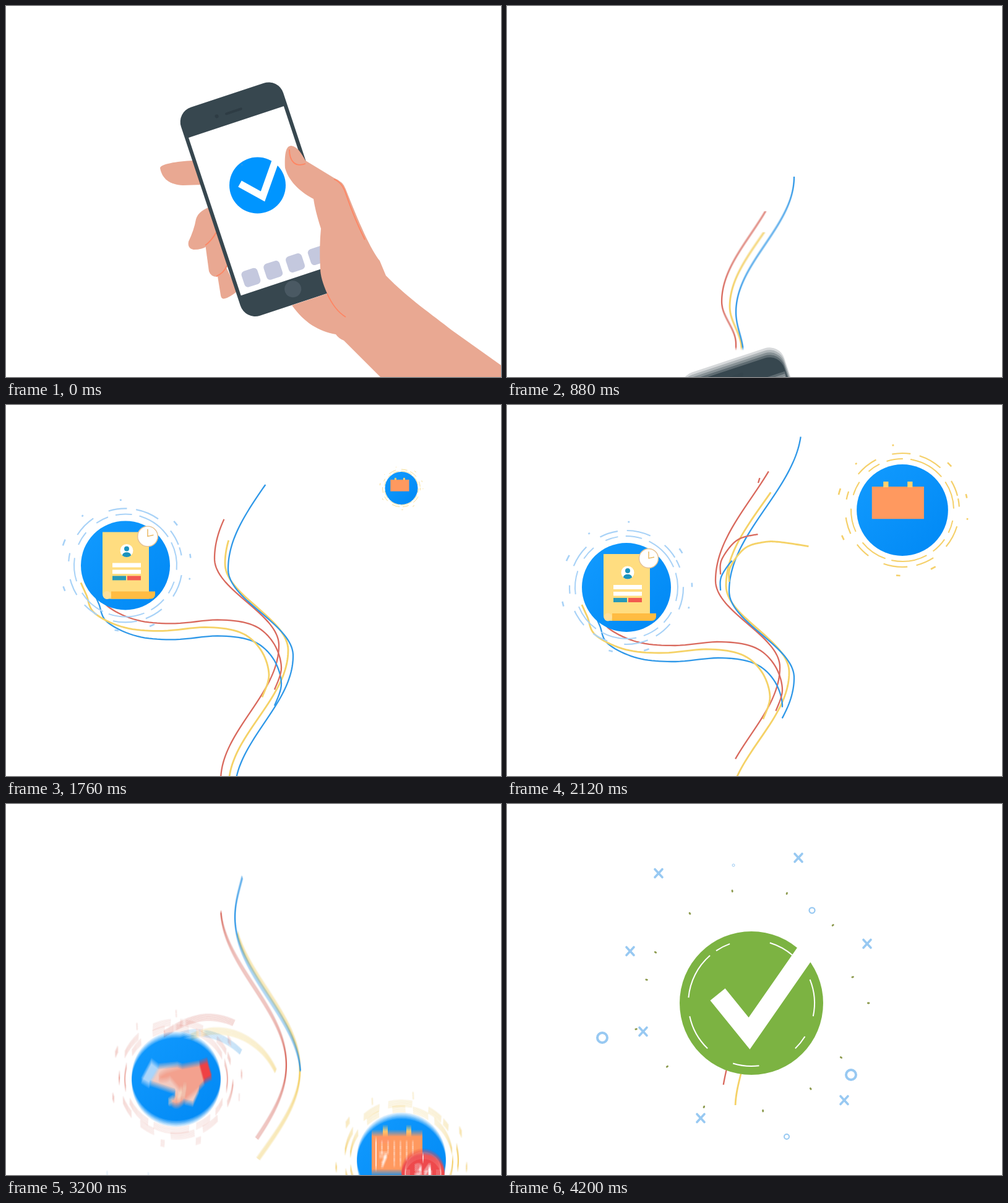
Write an HTML page with a canvas that moves like this. It is 800 px wide and 600 px high and loops after 4.24 s.

```html
<!DOCTYPE html>
<html lang="en">
<head>
<meta charset="utf-8">
<title>Phone journey</title>
<style>
html, body { margin: 0; width: 100%; height: 100%; overflow: hidden; background: #fff; }
canvas { display: block; }
</style>
</head>
<body>
<canvas id="stage" width="800" height="600"></canvas>
<script>
const LOOP = 4240, STEP = 40;
const view = document.getElementById('stage').getContext('2d');
const layer = document.createElement('canvas');
layer.width = 800; layer.height = 600;
const c = layer.getContext('2d');

const BLUE = '#2f98e8', RED = '#d9695d', YELLOW = '#f5d267', SKIN = '#e9a892', CREASE = '#ff8562';

// ---------- timing ----------
const clamp = x => Math.max(0, Math.min(1, x));
const span = (t, a, b) => clamp((t - a) / (b - a));
const ease = x => 1 - (1 - x) ** 3;
const pop = x => x <= 0 ? 0 : 1 + 2.2 * (x - 1) ** 3 + 1.2 * (x - 1) ** 2;

function random(seed) {
  return () => (seed = (seed * 16807 + 11) % 2147483647) / 2147483647;
}

// camera keys: time, offset, speed
const CAMERA = [[0, 0, 0], [480, 130, .54], [1320, 382, .1], [2120, 461, .1],
  [2720, 611, .42], [3200, 867, .64], [3880, 1185, 0]];
function camera(t) {
  const i = CAMERA.findIndex(k => k[0] >= t);
  if (i < 0) return 1185;
  if (i === 0) return 0;
  const [t0, s0, v0] = CAMERA[i - 1], [t1, s1, v1] = CAMERA[i];
  const d = t1 - t0, x = (t - t0) / d, y = 1 - x;
  return s0 * (1 + 2 * x) * y * y + v0 * d * x * y * y + s1 * x * x * (3 - 2 * x) - v1 * d * x * x * y;
}

// ---------- drawing helpers ----------
function at(x, y, scale, draw, angle = 0) {
  if (scale <= 0) return;
  c.save(); c.translate(x, y); c.rotate(angle); c.scale(scale, scale); draw(); c.restore();
}
function disc(x, y, r, fill) {
  c.beginPath(); c.arc(x, y, r, 0, 7); c.fillStyle = fill; c.fill();
}
function hoop(x, y, r, color, width, a = 0, b = Math.PI * 2) {
  c.beginPath(); c.arc(x, y, r, a, b); c.strokeStyle = color; c.lineWidth = width; c.stroke();
}
function box(x, y, w, h, fill, r = 0) {
  c.beginPath(); c.roundRect(x, y, w, h, r); c.fillStyle = fill; c.fill();
}
function line(color, width, ...p) {
  c.beginPath();
  for (let i = 0; i < p.length; i += 2) c.lineTo(p[i], p[i + 1]);
  c.strokeStyle = color; c.lineWidth = width; c.stroke();
}
function shape(fill, d) { c.fillStyle = fill; c.fill(new Path2D(d)); }
function stroke(color, width, d) { c.strokeStyle = color; c.lineWidth = width; c.stroke(new Path2D(d)); }
function label(s, x, y, size) {
  c.font = `bold ${size}px "Open Sans", sans-serif`;
  c.textAlign = 'center'; c.textBaseline = 'middle'; c.fillStyle = '#fff'; c.fillText(s, x, y);
}

// ---------- ribbons ----------
const thickness = color => color === YELLOW ? 2.8 : 2.3;

// A stem is a chain of half cosine waves between the turning levels.
const LEVELS = [258, 190, -29, -169, -437, -693, -800];
const STEMS = [
  { color: RED, lag: -8, turns: [370, 347, 441, 337, 453, 347, 362], head: 312, tail: 970, speed: .405 },
  { color: YELLOW, lag: 0, turns: [379, 360, 456, 354, 475, 369, 386], head: 346, tail: 1003, speed: .405 },
  { color: BLUE, lag: 9, turns: [382, 370, 464, 359, 476, 370, 388], head: 256, tail: 989, speed: .445 }
];

function stemX({ turns, lag }, y) {
  const level = y - lag;
  let i = 1;
  while (i < LEVELS.length - 1 && LEVELS[i] > level) i++;
  const u = span(level, LEVELS[i - 1], LEVELS[i]);
  return turns[i - 1] + (turns[i] - turns[i - 1]) * (1 - Math.cos(Math.PI * u)) / 2;
}

function drawStem(s, t) {
  const top = Math.max(-800, s.head - .314 * t), bottom = Math.min(258, s.tail - s.speed * t);
  const points = [];
  for (let y = bottom; y > top; y -= 4) points.push(stemX(s, y), y);
  if (top < bottom) points.push(stemX(s, top), top);
  line(s.color, thickness(s.color), ...points);
}

// Three shifted copies of one curve lead from the stem to a badge.
const BRANCHES = [
  { points: [434, 35, 445, -1, 432, -41, 400, -69, 345, -78, 270, -72, 210, -78, 163, -101, 150, -130, 141, -150],
    strands: [[BLUE, 0, 26], [RED, 0, 0], [YELLOW, -20, 12]], start: 1080, gap: 95, rate: .0208, leave: 1970 },
  { points: [345, -187, 347, -211, 370, -241, 400, -251, 430, -251, 500, -240, 570, -229, 597, -232, 640, -245],
    strands: [[YELLOW, 14, 12], [RED, 0, 0], [BLUE, 0, 26]], start: 1862, gap: 80, rate: .018, leave: 2600 },
  { points: [406, -335, 429, -414, 428, -445, 405, -485, 370, -512, 330, -522, 293, -515, 255, -495],
    strands: [[RED, 0, 0], [BLUE, -20, 25], [YELLOW, 13, 22]], start: 2105, gap: 200, rate: .01, leave: 2548 }
];

function curvePoint(p, u) {
  const last = p.length / 2 - 1, i = Math.min(last - 1, Math.floor(u)), x = u - i;
  return [0, 1].map(k => {
    const [a, b, d, e] = [-1, 0, 1, 2].map(o => p[2 * Math.max(0, Math.min(last, i + o)) + k]);
    return b + .5 * x * (d - a + x * (2 * a - 5 * b + 4 * d - e + x * (3 * (b - d) + e - a)));
  });
}

function drawBranch({ points, strands, start, gap, rate, leave }, t) {
  const last = points.length / 2 - 1;
  strands.forEach(([color, dx, dy], i) => {
    const head = Math.min(last, (t - start - i * gap) * rate);
    const tail = Math.max(0, (t - leave - i * 140) * .0062);
    if (head <= tail) return;
    const path = [];
    for (let k = 0; k <= 80; k++) path.push(...curvePoint(points, tail + (head - tail) * k / 80));
    at(dx, dy, 1, () => line(color, thickness(color), ...path));
  });
}

// ---------- phone and hand ----------
function phone() {
  shape(SKIN, 'M303 250C275 251 249 256 249 262C252 279 264 289 286 290L318 289Z');
  shape(SKIN, 'M342 437L347 468Q348 475 354 473Q362 471 374 461L350 410Z');
  shape(SKIN, 'M322 385L328 429Q331 438 341 438Q352 432 360 418L340 360Z');
  shape(SKIN, 'M327 326Q310 333 307 345Q304 362 295 381Q293 392 303 394Q318 394 325 388Q333 380 342 364Z');
  stroke(CREASE, 1.8, 'M322 387Q331 381 340 366M340 437Q352 432 357 420');
  at(414.3, 315.1, 1, () => {
    box(-87, -180, 174, 355, '#37474f', 25);
    box(-81, -134.5, 162, 269, '#fff');
    c.lineCap = 'round';
    line('#2e3c44', 4, -11, -152, 14, -152);
    c.lineCap = 'butt';
    disc(-27, -153, 3, '#2e3c44');
    disc(2, 151, 13.5, '#4a5963');
    for (let i = 0; i < 4; i++) box(-70 + i * 37.7, 98.5, 27, 27, '#c4c8de', 6);
  }, -.32);
  disc(406.5, 290, 45.5, '#0095ff');
  line('#fff', 11.5, 378, 287.5, 415, 308, 437, 246);
  shape(SKIN, `M519 465Q508 440 508 425Q506 390 509 360C502 338 499 325 497 312
    C480 303 458 287 451 262C450 240 452 226 461 226C472 228 477 238 484 250L530 278
    Q545 284 549 296C570 350 590 395 604 412L614 436C650 473 690 500 720 524L800 581V600H605
    L546 541Q538 538 533 531C505 526 482 512 462 484Z`);
  stroke(CREASE, 1.8, `M458 232C458 252 468 261 484 255M530 280Q543 285 549 303Q563 344 580 378
    M519 465Q531 492 549 503`);
}

// ---------- badges ----------
function dashes(seed, long, gap) {
  const next = random(seed);
  return Array.from({ length: 12 }, (_, i) => (i % 2 ? gap : long) * (.35 + next()));
}
const RINGS = [
  { gap: 11, width: 2, turn: 1, dash: dashes(71, 60, 18) },
  { gap: 20, width: 2.2, turn: -1, dash: dashes(523, 38, 28) },
  { gap: 34, width: 2.6, turn: .6, dash: dashes(97, 8, 85) }
];

function badge(x, y, from, t, ink, icon) {
  at(x, y, pop(span(t, from, from + 500)), () => {
    const g = c.createLinearGradient(-72, -72, 72, 72);
    g.addColorStop(0, '#129bff'); g.addColorStop(1, '#0088f4');
    disc(0, 0, 72, g);
    icon();
  });
  for (const { gap, width, turn, dash } of RINGS)
    at(x, y, ease(span(t, from, from + 400)), () => {
      c.setLineDash(dash);
      hoop(0, 0, 72 + gap, ink, width);
    }, turn * (t - from) * .0005);
}

function paper(t) {
  const open = ease(span(t, 1320, 1660)), show = pop(span(t, 1312, 1680));
  const top = -45 - 9 * open, bottom = 31 + 23 * open;
  box(-37, top, 75, bottom - top, '#ffdd80', [0, 0, 0, 8 * open]);
  if (open > 0) {
    box(-23, bottom - 12 * open, 71 * open, 12 * open, '#ffbc42', [0, 0, 7, 0]);
    disc(-30, bottom - 6, 6.5 * open, '#ffe09a');
  }
  at(2, -32 + 8 * open, show, () => {
    disc(0, 0, 10.5, '#fff');
    disc(0, -3, 4, '#1b93bd');
    shape('#1b93bd', 'M-7 8C-7 1 7 1 7 8Q0 13 -7 8Z');
  });
  at(2, 10, show, () => {
    box(-23, -14, 46, 7, '#fff'); box(-23, -3, 46, 6.5, '#fff');
    box(-23, 7, 22, 7, '#2799b8'); box(1, 7, 22, 7, '#f25a4f');
  });
  at(36, -47, pop(span(t, 1560, 1860)), () => {
    disc(0, 0, 16, '#fff');
    hoop(0, 0, 15.5, '#e5c091', 1.4);
    line('#e9b862', 1.4, 0, -11, 0, 0, 9, -2);
  });
}

function calendar(t) {
  const open = ease(span(t, 2120, 2420));
  const top = -37 - 7 * open;
  box(-48, top, 82, 51 + 13 * open, '#ff995f');
  box(-30, top - 8, 8, 9, '#ffd170'); box(8, top - 8, 8, 9, '#ffd170');
  c.save();
  c.globalAlpha *= span(t, 2200, 2440);
  line('#fff', 1.5, -41, -34, -41, 14);
  line('#ff8b8b', 2, -39, -33, -18, -33);
  for (let i = 0; i < 24; i++) {
    const col = i % 6, row = i / 6 | 0;
    if (row < 2 || col > 1) box(-33 + col * 10, -28 + row * 10, 3, 5, '#ffe3d2');
  }
  label('7', -29, 2, 26);
  c.restore();
  at(35, 21, pop(span(t, 2260, 2560)), () => {
    disc(0, 0, 35, '#ee494c');
    hoop(0, 0, 29, '#ffc5c0', 1.5);
    for (let i = 0; i < 4; i++) at(0, 0, 1, () => line('#fff', 2, 0, -29, 0, -21), i * Math.PI / 2);
    label('24', 0, 0, 27);
  });
}

function handshake(t) {
  const close = span(t, 2720, 2920), lift = -8 * close + Math.sin(span(t, 2920, 3600) * 12) * 2;
  c.beginPath(); c.arc(0, 0, 72, 0, 7); c.clip();
  at(15 * close, lift, 1, () => {
    shape('#f2cbc1', 'M-44 -11L-13 -14L3 -8L20 10L22 28L12 50L0 47L-14 40L-17 30L-58 16Z');
    shape('#a9d5fb', 'M-72 12L-55 -20L-42 -10L-59 20Z');
  });
  at(-15 * close, lift, 1, () => {
    shape('#f3a18e', 'M58 -17L25 -11L0 -4Q-18 4 -12 11Q-2 13 5 8L22 28L6 48Q14 57 23 50L50 27L61 15Z');
    shape('#ef4144', 'M52 -16L65 -21L73 7L60 14Z');
  });
  at(4, 36 + lift, 1, () => {
    c.lineCap = 'round';
    for (let i = 0; i < 4; i++)
      line(i % 2 ? '#f0bdaa' : '#f6d2bd', 6, -8 + i * 6, 6 - i * 7, -14 + i * 7, 10 - i * 2);
    c.lineCap = 'butt';
  });
}

// ---------- finish ----------
const CROSSES = [[-150, -210], [76, -235], [-196, -84], [187, -96], [-175, 46], [-82, 186], [150, 157]];
const HOOPS = [[-241, 56, 8], [161, 116, 8], [98, -150, 4.5], [57, 216, 4], [-29, -223, 2]];

function confetti(burst) {
  c.lineCap = 'round';
  for (const [x, y] of CROSSES)
    at(x * burst, y * burst, burst, () => {
      line('#98c9f2', 3.6, -6, -6.5, 6, 6.5);
      line('#98c9f2', 3.6, -6, 6.5, 6, -6.5);
    });
  c.lineCap = 'butt';
  for (const [x, y, r] of HOOPS) hoop(x * burst, y * burst, r * burst, '#98c9f2', r / 2);
  const next = random(29);
  for (let i = 0; i < 14; i++) {
    const angle = (i + next() * .6) / 14 * Math.PI * 2, far = (168 + next() * 26) * burst;
    at(0, 0, 1, () => box(far - 2.2, -1.4, 4.4, 2.8, '#8c9a4e', 1.4), angle);
  }
}

function finish(t) {
  const burst = ease(span(t, 3700, 4200)), rad = Math.PI / 180;
  if (burst > 0) confetti(burst);
  at(0, 0, pop(span(t, 3480, 3800)), () => {
    disc(0, 0, 116, '#7cb342');
    const grow = span(t, 3720, 3960);
    for (let i = 0; i < 7; i++) {
      const from = 32 + i * 51, length = 14 + 10 * (i % 4);
      if (grow > 0) hoop(0, 0, 102, '#fff', 2, from * rad, (from + length * grow) * rad);
    }
    const drawn = 260 * ease(span(t, 3740, 4120));
    if (drawn > 0) {
      c.setLineDash([drawn, 400]);
      line('#fff', 31, -54.5, -14, -3.5, 49, 91, -87);
    }
  });
}

// ---------- scene ----------
function scene(t) {
  const drop = .000564 * t * t;
  c.fillStyle = '#fff'; c.fillRect(0, 0, 800, 600);
  c.save();
  c.beginPath(); c.rect(0, 38, 800, 562); c.clip();
  if (drop < 500) at(0, drop, 1, phone);
  at(0, camera(t), 1, () => {
    for (const s of STEMS) drawStem(s, t);
    for (const b of BRANCHES) drawBranch(b, t);
    badge(193, -166, 1115, t, '#a8d2f7', () => paper(t));
    badge(639, -291, 1710, t, '#f5d06a', () => calendar(t));
    badge(275, -422, 2310, t, '#eeb0a8', () => handshake(t));
    at(395, -863, 1, () => finish(t));
  });
  c.restore();
}

function frame() {
  const t = Math.floor(performance.now() % LOOP / STEP) * STEP;
  // average a short shutter when the camera is fast
  const move = camera(t + 8) - camera(Math.max(0, t - 8));
  const n = move < 2.5 ? 1 : Math.min(8, Math.ceil(move));
  for (let i = 0; i < n; i++) {
    scene(n > 1 ? Math.max(0, t - 8 + 16 * i / (n - 1)) : t);
    view.globalAlpha = 1 / (i + 1);
    view.drawImage(layer, 0, 0);
  }
  requestAnimationFrame(frame);
}
frame();
</script>
</body>
</html>
```
